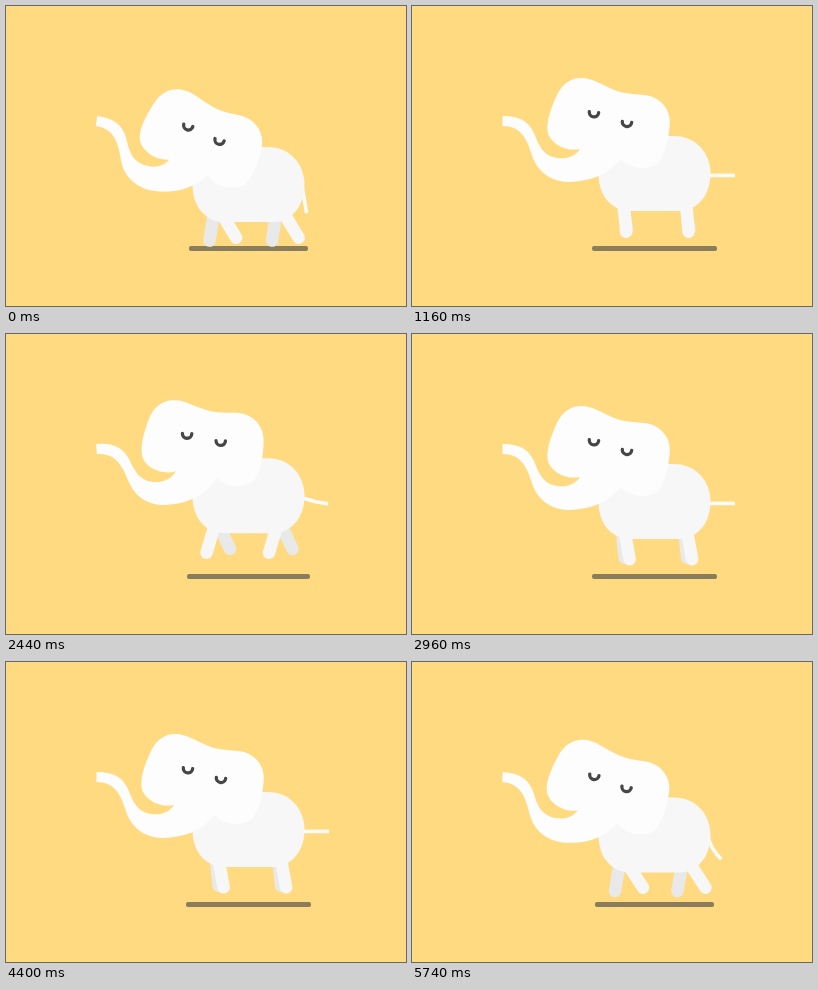
Write an HTML page that moves like this. It is 400x300 px and loops after 5760 ms.

```html
<!DOCTYPE html>
<html lang="en">
<head>
<meta charset="utf-8">
<title>Walking elephant</title>
<style>
  html, body { margin: 0; width: 100%; height: 100%; overflow: hidden; background: #ffda80; }
  svg { display: block; width: 100vw; height: 100vh; }
  .skin { fill: #f7f7f7; }
  .near { stroke: #f7f7f7; }
  .far { stroke: #e9e9e9; }
  .leg { stroke-width: 12.5; stroke-linecap: round; }
  #tail { fill: none; stroke: #fbfbfb; stroke-width: 3.6; }
  #shadow { fill: #8a7d5c; }
  #head { fill: #fdfdfd; }
  .eye { fill: none; stroke: #464646; stroke-width: 3.3; stroke-linecap: round; }
</style>
</head>
<body>
<svg viewBox="0 0 400 300">
  <rect id="shadow" y="240" height="5" rx="2"/>
  <g id="body">
    <line class="leg far" x1="209" y1="200" x2="209" y2="235"/>
    <line class="leg far" x1="271.5" y1="200" x2="271.5" y2="235"/>
    <path id="tail"/>
    <path class="skin" d="M224 141H262C284 141 298.500 158 298.500 179C298.500 201 284 216 268 216H218C200 216 186.500 201 186.500 179C186.500 158 202 141 224 141Z"/>
    <line class="leg near" x1="211" y1="200" x2="211" y2="237"/>
    <line class="leg near" x1="273.500" y1="200" x2="273.500" y2="237"/>
  </g>
  <g id="head">
    <path d="M90.500 110C107 110 116 115 121.500 126C126 136 128 145 138 150C150 155 162 152 168 143
      C155 146 141 139 136.500 129C133 119 138 104 145 89C150 78 159 72 169 72
      C184 72 192 82 212 87C224 90 236 87 246 94C256 101 259 111 257.500 122
      C256 135 253 148 247 156C239 165 219 165 208.500 153
      C196 168 180 176 156 176C137 175 126 165 121 152C116 138 112 120 90.500 120Z"/>
    <path class="eye" d="M-4.700 0A4.700 4.700 0 0 0 4.700 0" transform="translate(182 106.300) rotate(6)"/>
    <path class="eye" d="M-4.700 0A4.700 4.700 0 0 0 4.700 0" transform="translate(215 116) rotate(6)"/>
  </g>
</svg>
<script>
const STRIDE = 720, STEP = STRIDE / 2, RISE = 220, LIFT = 20.5;
const $ = id => document.getElementById(id);
const legs = name => [...document.querySelectorAll('.leg.' + name)];
const near = legs('near'), far = legs('far');

// time, base angle, tip angle
const TAIL = [[0, 80, 80], [80, 0, 0], [220, -35, -30], [340, 75, 43], [360, 80, 80]];

// cubic-bezier(.25, .1, .25, 1)
function ease(x) {
  let lo = 0, hi = 1, s = 0.5;
  for (let i = 0; i < 24; i++) {
    s = (lo + hi) / 2;
    if (0.75 * s * (1 - s) + s ** 3 < x) lo = s; else hi = s;
  }
  return 0.3 * s * (1 - s) ** 2 + 3 * s * s * (1 - s) + s ** 3;
}

// eased rise, accelerating fall
function lift(t) {
  if (t < RISE) return LIFT * Math.sin(t / RISE * Math.PI / 2);
  return LIFT * (1 - ((t - RISE) / (STEP - RISE)) ** 2);
}

function swing(t) {
  const m = (t + 16) % STRIDE;
  const s = 1 - 2 * ease(m % STEP / STEP);
  return m < STEP ? s : -s;
}

function tailPath(t) {
  const i = TAIL.findIndex(k => k[0] > t);
  const a = TAIL[i - 1], b = TAIL[i];
  const u = (t - a[0]) / (b[0] - a[0]);
  const seg = j => {
    const r = (a[j] + (b[j] - a[j]) * u) * Math.PI / 180;
    return [13.5 * Math.cos(r), 13.5 * Math.sin(r)];
  };
  const [cx, cy] = seg(1), [ex, ey] = seg(2);
  return `M296 180.5q${cx} ${cy} ${cx + ex} ${cy + ey}`;
}

function turn(set, deg) {
  for (const leg of set) {
    leg.setAttribute('transform', `rotate(${-deg} ${leg.getAttribute('x1')} 200)`);
  }
}

function draw(time) {
  const t = Math.floor(time / 20) * 20 % STRIDE;
  const beat = t % STEP;
  const up = lift(beat), s = swing(t);
  $('body').setAttribute('transform', `translate(0 ${-up})`);
  $('head').setAttribute('transform', `rotate(${8.2 * (1 - up / 11)} 91 115)`);
  turn(near, 7.6 + 25 * s);
  turn(far, 8 - 18 * s);
  $('tail').setAttribute('d', tailPath(beat));
  const half = 62.5 - 3 * Math.cos((beat + 10) / STEP * 2 * Math.PI);
  $('shadow').setAttribute('x', 242.5 - half);
  $('shadow').setAttribute('width', 2 * half);
}

const start = performance.now();
function tick() {
  draw(performance.now() - start);
  requestAnimationFrame(tick);
}
tick();
</script>
</body>
</html>
```
